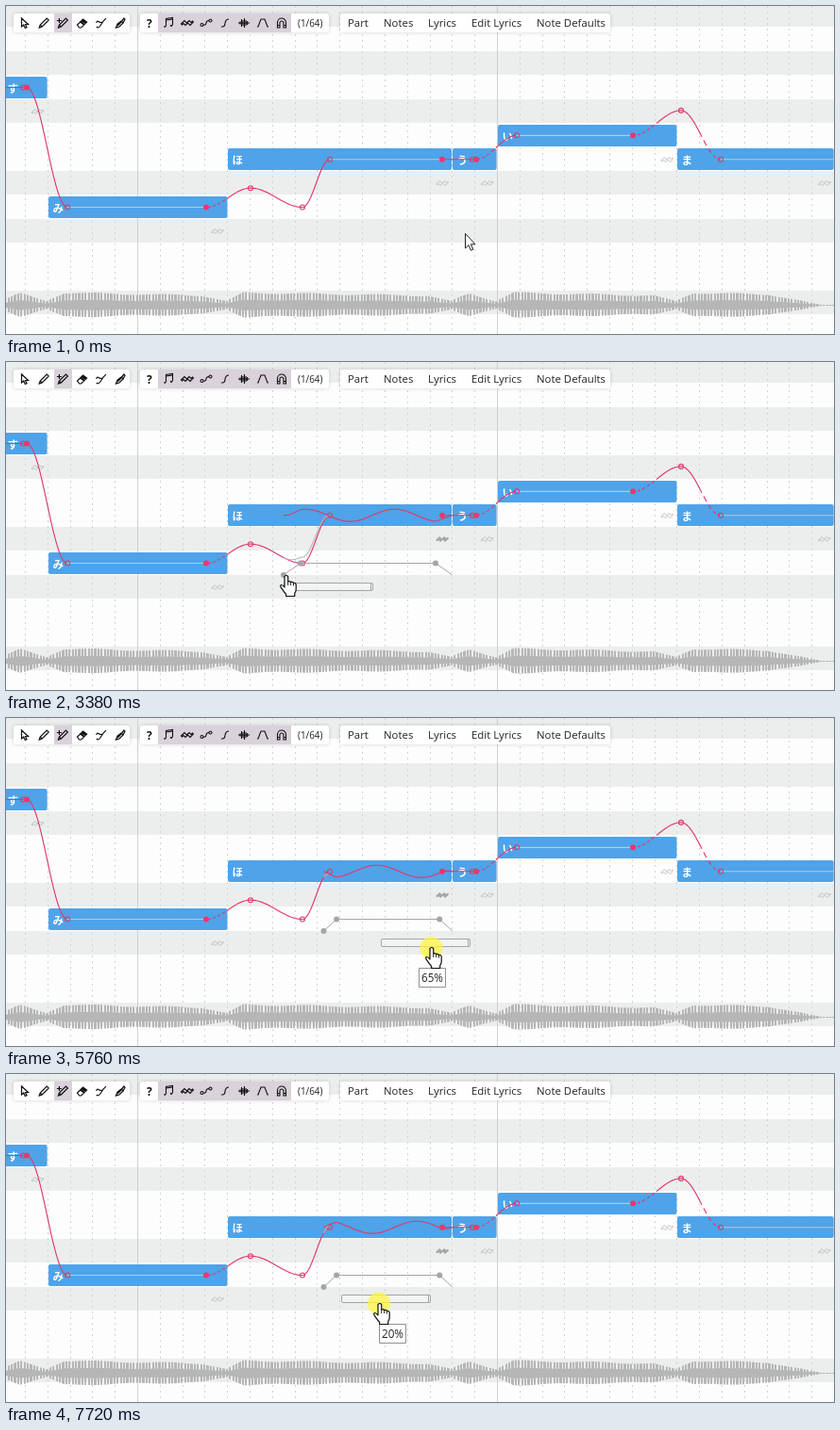
An HTML page with a canvas for the animation above (8000 ms loop, 877 by 348 pixels).

```html
<!DOCTYPE html>
<html lang="en">
<head>
<meta charset="utf-8">
<title>Vibrato editing</title>
<style>
html, body { margin: 0; width: 100%; height: 100%; overflow: hidden; background: #fdfdfd; }
canvas { display: block; width: 877px; height: 348px; }
</style>
</head>
<body>
<canvas id="stage" width="877" height="348"></canvas>
<script>
const W = 877, H = 348, LOOP = 8000;
const ctx = document.getElementById('stage').getContext('2d');
const UI = '"Open Sans", "Noto Sans", sans-serif';
const RED = '#e0396d', DOT = '#f0356f', GRAY = '#a5a4ab', INK = '#111';
const ROW = 25.4, STEP = 23.81, PERIOD = 94;
const LAG = 66; // the editor trails the pointer

const clamp = (v, a = 0, b = 1) => Math.max(a, Math.min(b, v));
const stepX = k => 139.5 + k * STEP;
const rowY = r => 10.3 + r * ROW;
const inside = (v, spans) => spans.some(([a, b]) => v >= a && v < b);

// Lyric, first grid step, length in steps, row
const NOTES = [
  ['す', -6, 2, 3], ['み', -4, 8, 8], ['ほ', 4, 10, 6],
  ['う', 14, 2, 6], ['い', 16, 8, 5], ['ま', 24, 7, 6]
].map(([lyric, k, len, row]) => ({ lyric, x: stepX(k), w: len * STEP, y: rowY(row) }));
const HELD = NOTES[2], HELD_END = HELD.x + HELD.w;

// Pointer moves: start, end, target x, target y
const MOVES = [
  [70, 820, 459, 187], [1980, 2660, 295, 230], [2660, 3380, 296, 226],
  [3650, 4190, 334, 227], [4390, 4600, 339, 228], [4860, 5140, 376, 240],
  [5480, 5861, 462, 244], [5960, 7040, 331, 241], [7110, 7640, 395, 243]
];
const PRESSED = [[1500, 1700], [3650, 4700], [5480, LOOP]];
const HANDS = [[760, 2050], [3380, 4920], [5070, LOOP]];

function pointer(t) {
  let x = 486, y = 241;
  for (const [a, b, tx, ty] of MOVES) {
    const e = 1 - (1 - clamp((t - a) / (b - a))) ** 1.5;
    x += (tx - x) * e;
    y += (ty - y) * e;
  }
  return { x, y };
}

function stroke(path, color, width = 1, fill) {
  path = new Path2D(path);
  if (fill) { ctx.fillStyle = fill; ctx.fill(path); }
  ctx.strokeStyle = color;
  ctx.lineWidth = width;
  ctx.stroke(path);
}

function box(x, y, w, h, r, fill, line) {
  ctx.beginPath();
  ctx.roundRect(x, y, w, h, r);
  if (fill) { ctx.fillStyle = fill; ctx.fill(); }
  if (line) { ctx.strokeStyle = line; ctx.lineWidth = 1; ctx.stroke(); }
}

function text(s, x, y, font, color = '#222') {
  ctx.font = font;
  ctx.fillStyle = color;
  ctx.fillText(s, x, y);
  return ctx.measureText(s).width;
}

function dot(x, y, r, fill, line) {
  ctx.beginPath();
  ctx.arc(x, y, r, 0, 7);
  if (fill) { ctx.fillStyle = fill; ctx.fill(); }
  if (line) { ctx.strokeStyle = line; ctx.lineWidth = 1.1; ctx.stroke(); }
}

function at(x, y, draw) {
  ctx.save();
  ctx.translate(x, y);
  draw();
  ctx.restore();
}

function plot(fn, x0, x1, color, hidden = () => false) {
  ctx.beginPath();
  for (let x = x0; x <= x1; x++) ctx[hidden(x) ? 'moveTo' : 'lineTo'](x, fn(x));
  ctx.strokeStyle = color;
  ctx.lineWidth = 1.15;
  ctx.stroke();
}

function drawGrid() {
  ctx.fillStyle = '#fdfdfd';
  ctx.fillRect(0, 0, W, H);
  ctx.fillStyle = '#eceeed';
  for (const r of [0, 2, 4, 7, 9, 12]) ctx.fillRect(0, Math.round(rowY(r) - 12.9), W, 25);
  for (let k = -5; k < 31; k++) {
    const x = Math.round(stepX(k) - 0.5) + 0.5, bar = k % 16 === 0;
    ctx.setLineDash(bar ? [] : [2, 4]);
    stroke(`M${x} 0V${H}`, bar ? '#d0d0d2' : '#d2d3d3');
  }
  ctx.setLineDash([]);
}

// Each note swells quickly, decays and closes before the next
function loudness(x) {
  const n = NOTES.findLast(n => n.x <= x), d = x - n.x;
  const swell = clamp(0.4 + d / 28) * clamp(0.4 + (n.w - d) / 45);
  const wobble = 1 - 0.28 * d / n.w + 0.06 * Math.sin(x / 12);
  return Math.max(0.6, 14 * swell * wobble * clamp((868 - x) / 60));
}

function drawWave() {
  ctx.fillStyle = '#b6b6b6';
  for (let x = 0; x < W; x++) {
    const up = loudness(x) * (x / 3.4 % 1 < 0.34 ? 0.4 : 0.97);
    ctx.fillRect(x, 317.5 - up, 1, up * 1.93);
  }
}

const ZIGZAG = 'M-6.5 1L-3 -2.5L-.5 0L2 -2.5L4 -.5L5.5 -2L6.5 -1L3 2.5L.5 0L-2 2.5L-4 .5L-5.5 2Z';
function drawNotes(vibrato) {
  for (const n of NOTES) {
    const x = Math.round(n.x + 0.25), y = Math.round(n.y - 11.5), on = vibrato && n === HELD;
    box(x, y, n.w - 1, 23, 2, '#4fa3e8');
    text(n.lyric, x + 4.5, y + 16.5, 'bold 11.5px "Noto Sans CJK JP", "Noto Sans CJK", sans-serif', '#fff');
    at(n.x + n.w - 10.7, y + 37, () =>
      stroke(ZIGZAG, on ? '#9b9ba0' : '#b9babb', 0.9, on && '#a5a5aa'));
  }
}

// Control points: x, row, whether the dot is filled
const PITCH = [
  [18, 3], [22, 3, 1], [65, 8], [212, 8, 1], [259, 7.2], [314, 8], [343, 6],
  [462, 6, 1], [494, 6], [498, 6, 1], [541, 5], [664, 5, 1], [715, 3.96], [757, 6]
];
const DASHED = [[212, 235], [498, 520], [664, 690], [735, 757]];
const FLAT = [[65, 212], [343, 462], [541, 664], [757, W]];

function pitch(x) {
  const i = PITCH.findIndex(p => p[0] >= x);
  if (i < 1) return rowY(i ? 6 : 3);
  const [x0, r0] = PITCH[i - 1], [x1, r1] = PITCH[i];
  return rowY(r0 + (r1 - r0) * (1 - Math.cos(Math.PI * (x - x0) / (x1 - x0))) / 2);
}

function drawPitch(vibrato) {
  for (const [a, b] of FLAT)
    if (!vibrato || a !== 343) plot(pitch, a, b, 'rgba(200,206,218,.85)');
  plot(pitch, 0, 757, RED, x => inside(x, FLAT) || x % 5 > 2 && inside(x, DASHED));
  for (const [x, row, full] of PITCH)
    dot(x, rowY(row), full ? 3 : 2.5, full && DOT, !full && RED);
}

function drawVibrato(start, shift) {
  const fade = (HELD_END - start) / 10, top = rowY(8), foot = 226;
  const sway = x => -6.5 * clamp(Math.min(x - start, HELD_END - x) / fade) *
    Math.sin(2 * Math.PI * ((x - start) / PERIOD + shift));
  plot(x => pitch(x) + sway(x), start, 343, '#b9b6bb');
  plot(x => HELD.y + sway(x), start, HELD_END, RED);

  const a = start + fade, b = HELD_END - fade;
  stroke(`M${start} ${foot}L${a} ${top}H${b}L${HELD_END} ${foot}`, GRAY);
  dot(start, foot, 3, GRAY);
  dot(a, top, 3, GRAY);
  dot(b, top, 3, GRAY);

  const x = Math.floor(start + shift * PERIOD) + 0.5;
  box(x, 234.5, PERIOD, 8, 1.5, 'rgba(255,255,255,.3)', GRAY);
  stroke(`M${x + PERIOD - 2} 235V242`, GRAY);
}

function panel(x, w) {
  ctx.save();
  ctx.shadowColor = 'rgba(0,0,0,.16)';
  ctx.shadowBlur = 4;
  box(x, 8, w, 20, 3, '#fff');
  ctx.restore();
}

const PENCIL = 'M-5 5L-4 2L3 -5L5 -3L-2 4ZM-4 2L-2 4';
const TOOLS = [
  'M-3.5 -5V4L-1.3 2L.3 5.5L2 4.7L.5 1.5H3.5Z',
  PENCIL,
  PENCIL + 'M-4 -5V0M-6.5 -2.5H-1.5',
  'M-5 2L1 -4L5 -1L-1 5H-3ZM-2 -1L2 2L4 0L1 -3ZM-1 -1L2 1M0 -2L3 0',
  'M-5 0Q-5 -3 -2 -1Q1 1 5 -5M3 -3L-1 3Q-3 6 -5 4',
  'M-4.5 5L-3 1L1 -2L3 0L-1 4ZM-3 3L1 -1M1.5 -2L4 -5L5 -4L3 0Z'
];
const TOGGLES = [
  'M-2.5 3.5V-4.5L4.5 -5.5V2.5M-2.5 -3L4.5 -4M-4.5 3.5H-3M2 2.5H4M-4.5 4.3H-3M2 3.3H4',
  ZIGZAG,
  'M-6 2a1.5 1.5 0 1 0 3 0a1.5 1.5 0 1 0 -3 0M-3 2C2 3 -2 -3 3 -2.5a1.5 1.5 0 1 0 3 0a1.5 1.5 0 1 0 -3 0',
  'M-4 4C3 5 -3 -4 4 -4',
  'M-6 0H6M-4 -1.5V1.5M-2.5 -4V4M-1 -3V3M.5 -5V5M2 -3V3M3.5 -2V2',
  'M-6 4H-5L-2 -4H2L5 4H6',
  'M-4.5 5V-.5A4.5 4.5 0 0 1 4.5 -.5V5H2V0A2 2 0 0 0 -2 0V5ZM-4.5 2.5H-2M2 2.5H4.5'
];
function drawToolbar() {
  panel(8, 123);
  panel(142, 200);
  panel(354, 286);
  ctx.fillStyle = '#d9d2da';
  ctx.fillRect(51, 8, 19, 20);
  ctx.fillRect(161, 8, 141, 20);
  TOOLS.forEach((d, i) => at(20 + i * 20.2, 18, () => stroke(d, INK, 1.2)));
  TOGGLES.forEach((d, i) => at(172 + i * 20, 18, () => stroke(d, INK, 1.1)));
  text('?', 149, 22.5, `bold 12px ${UI}`, INK);
  text('(1/64)', 309, 22, `9.9px ${UI}`);
  let x = 362;
  for (const s of ['Part', 'Notes', 'Lyrics', 'Edit Lyrics', 'Note Defaults'])
    x += Math.round(text(s, x, 22, `11.4px ${UI}`)) + 16;
}

function drawTip(share, p) {
  const s = Math.round(share * 100) + '%', font = `11.7px ${UI}`;
  const x = Math.floor(p.x) + 0.5, y = Math.round(p.y + 22) + 0.5;
  ctx.font = font;
  box(x, y, Math.round(ctx.measureText(s).width) + 5, 20, 0, '#fff', '#919191');
  text(s, x + 2.5, y + 14.5, font);
}

const ARROW = 'M.5 .5V16L4 12.7L6.4 18.3L8.8 17.3L6.4 11.8H11Z';
const HAND = 'M-1 1.5Q1 -.5 2.7 1.5V7Q4.2 6 5.7 7.5Q7.4 6.9 8.5 8.3Q11 8 11.2 10.3V15.5' +
  'Q11.2 17.5 9.7 19.5V22.5H.7V20.5Q-2 17.5 -4.8 13.2Q-6 11 -4.5 10.5Q-3 10.3 -1 13Z';
function drawPointer(t, { x, y }) {
  at(Math.round(x), Math.round(y), () => {
    ctx.lineJoin = 'round';
    if (!inside(t, HANDS)) return stroke(ARROW, '#222', 1, '#fff');
    stroke(HAND, INK, 1.2, '#fff');
    stroke('M2.7 7V11M5.7 7.7V11M8.5 8.5V11.5', INK, 0.9);
  });
}

function render(t) {
  const now = pointer(t), late = pointer(t - LAG);
  const vibrato = t >= 1550, stretching = t >= 3650 && t < 4700, sliding = t >= 5480;
  const start = t < 3650 ? 294 : Math.min(late.x, 338.5) - 2;
  const edge = t < 4860 ? start : 336.5;
  const shift = sliding ? clamp((late.x - 376) / PERIOD) : 0;

  drawGrid();
  drawWave();
  drawNotes(vibrato);
  drawPitch(vibrato);
  if (vibrato) drawVibrato(edge, shift);
  drawToolbar();
  if (stretching) drawTip((HELD_END - edge) / HELD.w, late);
  if (sliding) drawTip(shift, late);
  if (inside(t, PRESSED)) dot(now.x, now.y + 0.5, 12, 'rgba(255,246,60,.74)');
  drawPointer(t, now);
}

const begin = performance.now();
function tick() {
  render((performance.now() - begin) % LOOP);
  requestAnimationFrame(tick);
}
tick();
</script>
</body>
</html>
```
